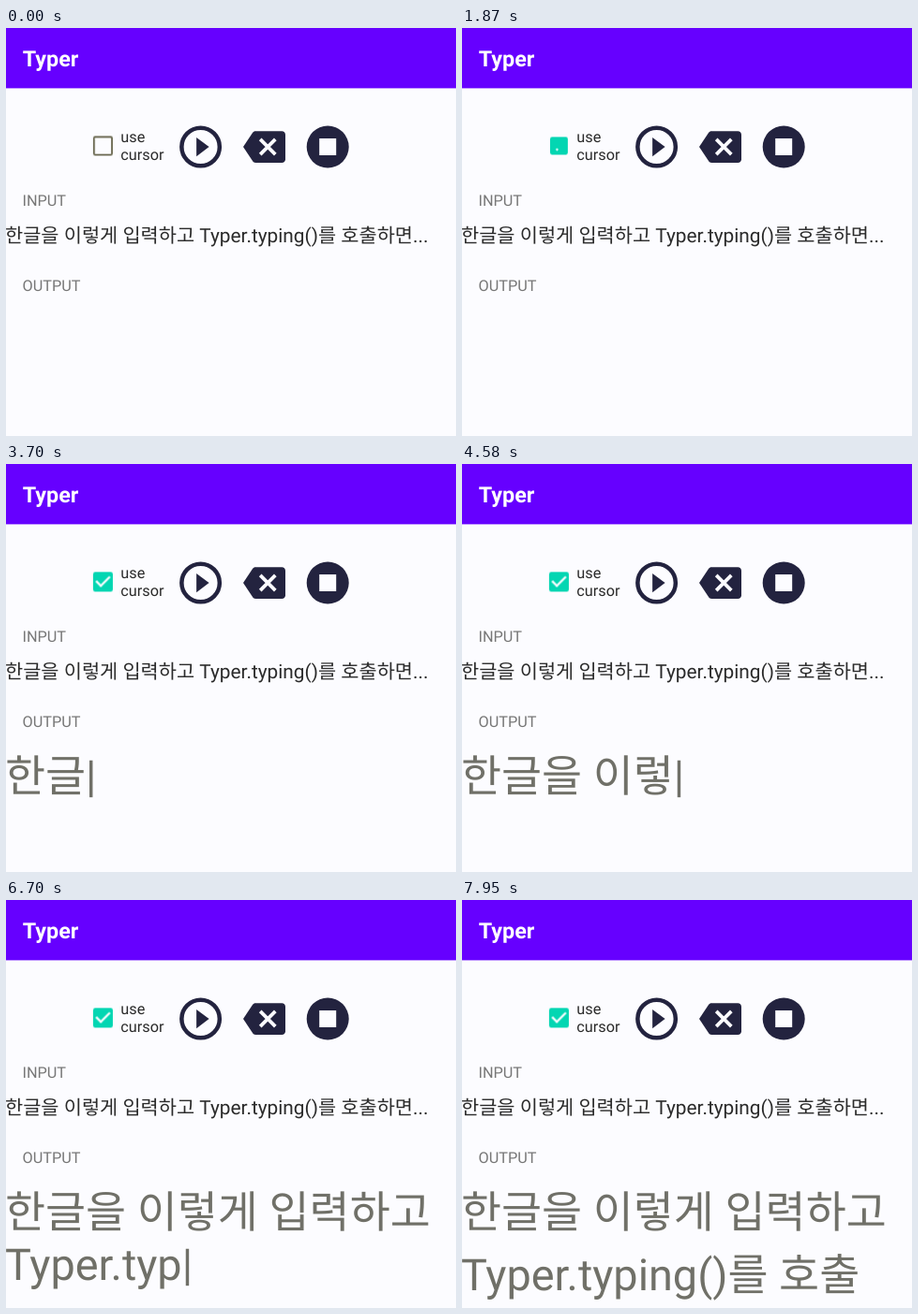
Animation, 480 px wide and 436 px high, one loop 8 s. Source, as an HTML page:

```html
<!DOCTYPE html>
<html lang="ko">
<head>
<meta charset="utf-8">
<title>Typer</title>
<style>
html, body { margin: 0; width: 100%; height: 100%; overflow: hidden; background: #fcfcff; }
svg { display: block; width: 480px; height: 436px; }
text {
  font-family: Roboto, "Noto Sans CJK KR", "Noto Sans CJK", sans-serif;
  white-space: pre;
  text-rendering: geometricPrecision;
  fill: #2b2b2b;
}
.title { font-size: 23.4px; font-weight: 700; fill: #fff; }
.small { font-size: 16.3px; }
.label { font-size: 16.3px; fill: #777; }
.input { font-size: 20.85px; }
.output { font-size: 46.8px; fill: #707068; }
.icon { fill: #23233f; }

/* checkbox: box fills inwards, then the tick grows from its corner */
.box, .frame, .hole, .tick { animation: 8s linear infinite; }
.box { animation-name: squeeze; }
.frame { fill: #6a6850; animation-name: tint; }
.hole { fill: #fcfcff; animation-name: fill; }
.tick {
  fill: none; stroke: #fcfcff; stroke-width: 2;
  stroke-dasharray: 1 2; stroke-dashoffset: 1;
  animation-name: draw;
}
@keyframes squeeze {
  0%, 21.1% { transform: scale(1); }
  23.2%, 23.5% { transform: scale(.9); }
  26.2%, 100% { transform: scale(1); }
}
@keyframes tint {
  0%, 21.1% { fill: #6a6850; }
  22%, 100% { fill: #03d6b2; }
}
@keyframes fill {
  0%, 21.1% { transform: scale(1); }
  23.1%, 100% { transform: scale(0); }
}
@keyframes draw {
  0%, 23.1% { stroke-dashoffset: 1; visibility: hidden; }
  23.11% { stroke-dashoffset: .94; visibility: visible; }
  23.4% { stroke-dashoffset: .86; visibility: visible; }
  26.2%, 100% { stroke-dashoffset: 0; visibility: visible; }
}
</style>
</head>
<body>
<svg viewBox="0 0 480 436">
  <rect width="480" height="436" fill="#fcfcff"/>
  <rect width="480" height="64.4" fill="#6600ff"/>
  <text class="title" x="17.7" y="41">Typer</text>

  <g transform="translate(103.4 125.9) scale(1.167)">
    <g class="box">
      <rect class="frame" x="-9" y="-9" width="18" height="18" rx="2"/>
      <rect class="hole" x="-7.4" y="-7.4" width="14.8" height="14.8" rx=".5"/>
      <path class="tick" pathLength="1" d="M-1.3 4.3L-2 3.6L-6.3 -.7"/>
      <path class="tick" pathLength="1" d="M-2.7 4.3L-2 3.6L6.3 -4.7"/>
    </g>
  </g>
  <text class="small" x="122.3" y="122">use</text>
  <text class="small" x="122.3" y="141">cursor</text>

  <g class="icon">
    <g transform="translate(207.6 127) scale(2.25)">
      <circle r="9" fill="none" stroke="#23233f" stroke-width="2"/>
      <path d="M-2 4.5L4 0L-2 -4.5z"/>
    </g>
    <g transform="translate(275.5 127) scale(1.875)">
      <path d="M10 -9H-5c-.69 0-1.23.35-1.59.88L-12 0l5.41 8.11c.36.53.9.89 1.59.89h15c1.1 0 2-.9 2-2V-7c0-1.1-.9-2-2-2z"/>
      <path d="M-2.3 -4.3L6.3 4.3M6.3 -4.3L-2.3 4.3" stroke="#fcfcff" stroke-width="2"/>
    </g>
    <g transform="translate(343.2 127) scale(2.25)">
      <circle r="10"/>
      <rect x="-4" y="-4" width="8" height="8" fill="#fcfcff"/>
    </g>
  </g>

  <text class="label" x="17.5" y="190">INPUT</text>
  <text class="input" x="-1" y="229">한글을 이렇게 입력하고 Typer.typing()를 호출하면...</text>
  <text class="label" x="17.5" y="280.7">OUTPUT</text>
  <text class="output" id="line1" x="-1" y="349.5"></text>
  <text class="output" id="line2" x="-1" y="406"></text>
</svg>
<script>
const LOOP = 8000, LEAD = 15;
const PHRASE = '한글을 이렇게 입력하고 Typer.typing()를 호출';
const BREAK = PHRASE.indexOf('T');
const INITIALS = 'ㄱㄲㄴㄷㄸㄹㅁㅂㅃㅅㅆㅇㅈㅉㅊㅋㅌㅍㅎ';

// keystroke number and its time; strokes between are evenly spaced
const PACE = [
  [1, 3270], [7, 3750], [8, 4000], [15, 4580], [16, 4660], [25, 5620], [26, 5790],
  [27, 5910], [32, 6250], [33, 6410], [38, 6700], [44, 7200], [45, 7330], [52, 7950]
];

// stages a character passes through while typed: initial, vowel, final
function stages(ch) {
  const code = ch.charCodeAt(0) - 0xAC00;
  if (code < 0 || code > 11171) return [ch];
  const list = [INITIALS[Math.floor(code / 588)]];
  if (code % 28) list.push(String.fromCharCode(0xAC00 + code - code % 28));
  return list.concat(ch);
}

const states = [''];
[...PHRASE].forEach((ch, i) => {
  for (const part of stages(ch)) states.push(PHRASE.slice(0, i) + part);
});

function strokes(t) {
  let count = 0;
  PACE.forEach(([n, at], i) => {
    if (t < at) return;
    const [n2, at2] = PACE[i + 1] || [n, at + 1];
    count = n + Math.min(n2 - n, Math.floor((t - at) / (at2 - at) * (n2 - n) + 1e-6));
  });
  return count;
}

const line1 = document.getElementById('line1');
const line2 = document.getElementById('line2');
let start, shown = -1;

function draw(now) {
  start ??= now;
  const count = strokes((now - start) % LOOP + LEAD);
  if (count !== shown) {
    shown = count;
    const typing = count > 0 && count < states.length - 1;
    const text = states[count] + (typing ? '|' : '');
    const wrapped = states[count].length > BREAK;
    line1.textContent = wrapped ? text.slice(0, BREAK) : text;
    line2.textContent = wrapped ? text.slice(BREAK) : '';
    // Hangul makes the second line taller
    line2.setAttribute('y', /[ㄱ-힣]/.test(line2.textContent) ? 417 : 406);
  }
  requestAnimationFrame(draw);
}
requestAnimationFrame(draw);
</script>
</body>
</html>
```
